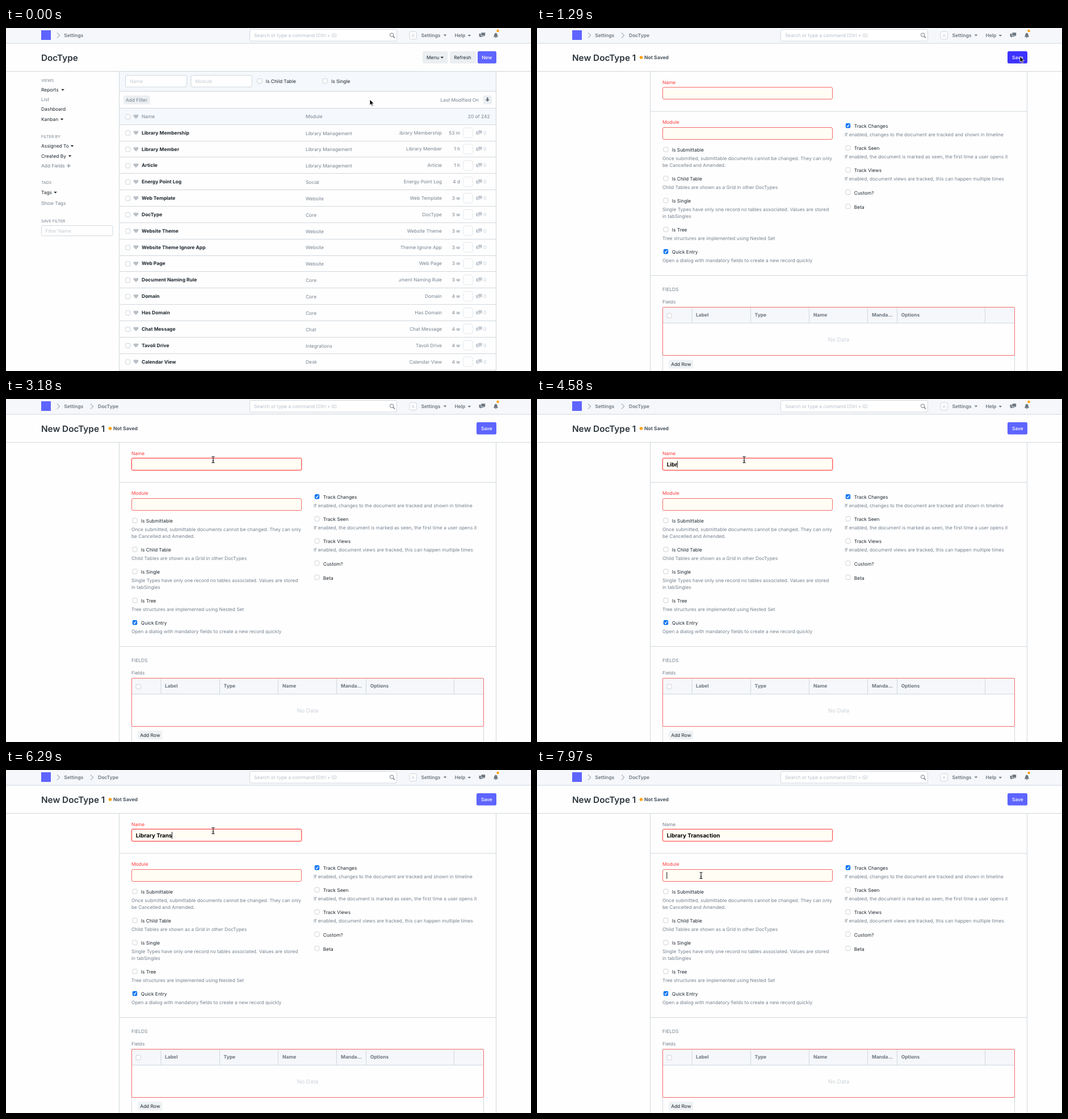
Animation, 925 px wide and 605 px high, one loop 8 s. Source, as an HTML page:

```html
<!DOCTYPE html>
<html lang="en">
<head>
<meta charset="utf-8">
<title>DocType</title>
<style>
html, body { margin: 0; width: 100%; height: 100%; overflow: hidden; background: #fefefe; }
svg { display: block; }
text { font-family: Inter, sans-serif; text-rendering: geometricPrecision; white-space: pre; }
</style>
</head>
<body>
<svg id="stage" width="925" height="605" viewBox="0 0 925 605"></svg>
<script>
const INK = '#1f272e', GREY = '#76828f', SLATE = '#6c7680', PALE = '#c3cad1', LINE = '#d1d8dd';
const RED = '#ff5858', BUTTON = '#ebeff2', BLUE = '#5e64ff', HEAD = '#f5f7fa';

// y is the middle of the capital letters
const text = (x, y, s, fill = INK, weight = 400, size = weight > 500 ? 8.5 : 8.37, anchor = 'start') =>
  `<text x="${x}" y="${y + size * .36}" fill="${fill}" font-weight="${weight}" font-size="${size}" text-anchor="${anchor}">${s}</text>`;
const rect = (x, y, w, h, fill = 'none', stroke = 'none', r = 0, more = '') =>
  `<rect x="${x}" y="${y}" width="${w}" height="${h}" rx="${r}" fill="${fill}" stroke="${stroke}" ${more}/>`;
const path = (d, fill = 'none', stroke = 'none', more = '') =>
  `<path d="${d}" fill="${fill}" stroke="${stroke}" ${more}/>`;
const line = (d, stroke = LINE, width = 1) => path(d, 'none', stroke, `stroke-width="${width}"`);
const group = (id, body) => `<g id="${id}">${body}</g>`;
const at = (x, y, body) => `<g transform="translate(${x} ${y})">${body}</g>`;

const down = (x, y, fill = INK) => path(`M${x - 2.8} ${y - 1.4}h5.6l-2.8 3z`, fill);
const next = x => line(`M${x - 2.5} 8.3l4.6 4.7l-4.6 4.7`, '#a9b3bd', 1.2);
const heart = (x, y) => at(x, y, path('M0 4.2L-3.9 .2C-5.6-2-2.4-5.2 0-2.3C2.4-5.2 5.6-2 3.9 .2Z', '#b9bfc6'));
const chat = (x, y, fill) => at(x, y, path('M-1.6-4.2h6.8v5h-1v1.8l-1.8-1.8h-4z', fill) +
  path('M-5.4-2.4h3v4h4.4v1.2h-3.8l-1.8 1.8v-1.8h-1.8z', fill));
const check = (x, y, on) => on
  ? rect(x - 4.2, y - 4.2, 8.4, 8.4, '#0b75f5', 'none', 2) + line(`M${x - 2.2} ${y}l1.7 1.9l2.8-4`, '#fff', 1.2)
  : rect(x - 4, y - 4, 8, 8, '#fff', '#c2c6ca', 1.8, 'stroke-width=".8"');
const button = (x, y, w, h, fill = BUTTON, id = '') => rect(x, y, w, h, fill, 'none', 2.5, id && `id="${id}"`);

const header = () => rect(0, 0, 925, 27, HEAD) + line('M0 27H925M0 76.5H925') +
  rect(62, 4, 17, 17, BLUE) + next(92.5) + text(102.3, 13, 'Settings', SLATE, 600) +
  rect(429.5, 2.5, 259, 20.5, '#fff', LINE, 2.5) +
  text(437, 13, 'Search or type a command (Ctrl + G)', '#b5bec7') +
  `<circle cx="679.6" cy="12.2" r="3.2" fill="none" stroke="${SLATE}"/>` + line('M682 14.6l3 3', SLATE, 1.4) +
  rect(711, 6.5, 12.5, 13, '#fefefe', LINE, 2.5) + text(717.3, 13, 'A', PALE, 400, 8, 'middle') +
  text(731.5, 13, 'Settings', SLATE, 600) + down(773.5, 13, SLATE) +
  text(790.5, 13, 'Help', SLATE, 600) + down(816.3, 13.5, SLATE) + chat(839, 12.5, SLATE) +
  at(863, 13, path('M-4.2 2.7C-2.2 1-3.5-3.8 0-4.3C3.5-3.8 2.2 1 4.2 2.7ZM-1.3 3.3h2.6a1.3 1.3 0 0 1-2.6 0z', SLATE)) +
  '<circle cx="866.5" cy="5" r="2.2" fill="#ffa00a"/>';

const heading = s => text(62, 52.3, s, '#2b343c', 600, 15.3);

const rows = [
  ['Library Membership', 'Library Management', '53 m'],
  ['Library Member', 'Library Management', '1 h'],
  ['Article', 'Library Management', '1 h'],
  ['Energy Point Log', 'Social', '4 d'],
  ['Web Template', 'Website', '3 w'],
  ['DocType', 'Core', '3 w'],
  ['Website Theme', 'Website', '3 w'],
  ['Website Theme Ignore App', 'Website', '3 w'],
  ['Web Page', 'Website', '3 w'],
  ['Document Naming Rule', 'Core', '3 w'],
  ['Domain', 'Core', '4 w'],
  ['Has Domain', 'Core', '4 w'],
  ['Chat Message', 'Chat', '4 w'],
  ['Tavoli Drive', 'Integrations', '4 w'],
  ['Calendar View', 'Desk', '4 w']
];

const right = (x, y, s) => text(x, y, s, GREY, 400, 8.37, 'end');
const row = ([name, module, age], i) => {
  const y = 184.6 + 28.85 * i;
  return check(214.7, y + .6) + heart(229, y) + text(239, y, name, INK, 700) +
    text(528, y + .9, module, GREY) +
    `<g clip-path="url(#tail)">${right(768, y, name)}</g>` + right(800, y, age) +
    rect(805.5, y - 8.4, 17, 17, 'none', LINE, 3, 'stroke-dasharray="2 1.5"') +
    chat(833.5, y, PALE) + text(841, y, '0', PALE) +
    line(`M200 ${Math.round(y + 14) + .5}H863`);
};

const sidebar = () =>
  [[92, 'VIEWS'], [191, 'FILTER BY'], [272.5, 'TAGS'], [340.5, 'SAVE FILTER']]
    .map(([y, s]) => text(62, y, s, GREY, 400, 7)).join('') +
  [[109, 'Reports', 100], [161, 'Kanban', 98.5], [208, 'Assigned To', 116.5], [225.7, 'Created By', 112.5], [290, 'Tags', 87]]
    .map(([y, s, x]) => text(62, y, s) + down(x, y + .2)).join('') +
  text(62, 143, 'Dashboard') + text(62, 126, 'List', GREY) + text(62, 243, 'Add Fields', GREY) +
  text(62, 309, 'Show Tags', GREY) + line('M107 243h7M110.5 239.5v7', GREY) +
  rect(62.5, 348.5, 125.5, 18, '#fff', LINE, 2.5) + text(69.5, 358, 'Filter Name', PALE);

const list = () => heading('DocType') +
  button(734, 41, 44.5, 21.5) + text(741, 52, 'Menu') + down(768.3, 52.2) +
  button(782, 41, 46, 21.5) + text(789.3, 52, 'Refresh') +
  button(831, 41, 33, 21.5, BLUE, 'new') + text(838.3, 52, 'New', '#fff', 500) + sidebar() +
  rect(200, 77, 663, 34, '#f5f8fc') + rect(200, 142, 663, 28, '#f5f8fc') +
  line('M199.5 77V605M863.5 77V605M200 111.5H863M200 141.5H863M200 170.5H863') +
  rect(210.5, 83.5, 108, 20.5, '#fff', LINE, 2.5) + text(218, 94, 'Name', PALE) +
  rect(326, 83.5, 107.5, 20.5, '#fff', LINE, 2.5) + text(333.5, 94, 'Module', PALE) +
  check(446.8, 93.5) + text(457.8, 94.3, 'Is Child Table') + check(562, 93.5) + text(573, 94.3, 'Is Single') +
  button(207, 119, 46.5, 15.5) + text(211, 127, 'Add Filter', GREY) +
  right(833, 127, 'Last Modified On') + button(840.5, 119, 15.5, 15.5) +
  path('M847 122.5h2.6v3.6h2.3l-3.6 4l-3.6-4h2.3z', SLATE) +
  check(214.7, 156.7) + heart(229, 156) + text(239, 156.2, 'Name', GREY) + text(528, 156.2, 'Module', GREY) +
  right(852.5, 156.2, '20 of 242') + rows.map(row).join('');

const field = (id, y) => rect(221, y - .5, 300, 22, 'none', RED, 3, `id="${id}Glow" stroke-width="3" opacity="0"`) +
  rect(221.5, y, 299, 21, '#fffdf4', '#f56a6a', 2.5, `id="${id}Box"`);

const options = [
  [227, 215, 'Is Submittable', 'Once submitted, submittable documents cannot be changed. They can only', 'be Cancelled and Amended.'],
  [227, 266, 'Is Child Table', 'Child Tables are shown as a Grid in other DocTypes'],
  [227, 305, 'Is Single', 'Single Types have only one record no tables associated. Values are stored', 'in tabSingles'],
  [227, 356, 'Is Tree', 'Tree structures are implemented using Nested Set'],
  [227, 395, 'Quick Entry', 'Open a dialog with mandatory fields to create a new record quickly'],
  [548, 173, 'Track Changes', 'If enabled, changes to the document are tracked and shown in timeline'],
  [548, 212, 'Track Seen', 'If enabled, the document is marked as seen, the first time a user opens it'],
  [548, 251, 'Track Views', 'If enabled, document views are tracked, this can happen multiple times'],
  [548, 290.3, 'Custom?'],
  [548, 315.3, 'Beta']
];
const option = ([x, y, label, ...notes]) =>
  check(x, y - .7, /Quick|Changes/.test(label)) + text(x + 10.8, y + .2, label) +
  notes.map((s, i) => text(x - 6, y + 14.8 + 12 * i, s, GREY)).join('');

const form = () => next(151.5) + text(162, 13, 'DocType', SLATE, 600) + heading('New DocType 1') +
  '<circle cx="183.5" cy="52" r="2.8" fill="#ffa00a"/>' + text(189, 52, 'Not Saved', '#4b5660', 700, 8.6) +
  button(829, 41, 35, 21.5, BLUE, 'save') + text(837, 52, 'Save', '#fff', 500) +
  line('M199.5 77V605M863.5 77V605M200 147H863M200 436.5H863') +
  group('nameLabel', text(221, 95.5, 'Name', 'currentColor')) + field('name', 104.5) +
  text(221, 166.3, 'Module', '#ff3b3b') + field('module', 175.5) +
  '<text id="typed" x="228.7" y="118.8" font-size="9.85" font-weight="700" fill="#000"></text>' +
  rect(228.3, 109.3, 1, 12, '#111', 'none', 0, 'id="caret"') +
  options.map(option).join('') +
  text(221, 460.5, 'FIELDS', GREY) + text(221, 483, 'Fields', GREY) +
  rect(222, 493, 619, 27.5, HEAD) +
  line('M222 520.5H841M273 493V520M376.5 493V520M479.5 493V520M582.5 493V520M634.5 493V520M789.5 493V520M221.5 577V605M841.5 577V605') +
  rect(221.5, 492.5, 620, 85, 'none', '#f56a6a', 1.5) + check(233.2, 507.3) +
  [[280, 'Label'], [383.5, 'Type'], [487, 'Name'], [590, 'Manda...'], [641.7, 'Options']]
    .map(([x, s]) => text(x, 506.3, s, SLATE, 700)).join('') +
  text(531.5, 549.7, 'No Data', '#ccd2d8', 400, 9.85, 'middle') +
  button(232.3, 585, 43, 15.5, '#eff2f5') + text(236.2, 593, 'Add Row');

const $ = id => document.getElementById(id);
$('stage').innerHTML = '<clipPath id="tail"><rect x="692" y="170" width="78" height="435"/></clipPath>' +
  header() + group('list', list()) + group('form', form()) +
  group('arrow', path('M0 0V10.2L2.3 8.1L3.9 11.8L5.6 11L4 7.5H7.2Z', '#000', '#fff', 'stroke-width=".8"')) +
  group('beam', line('M-2.5-5.5Q0-5.5 0-4V4Q0 5.5-2.5 5.5M2.5-5.5Q0-5.5 0-4M0 4Q0 5.5 2.5 5.5M-1.2 1.8H1.2', '#111', 1.1));

// Each track holds its last value until the next time
const ARROW = 'arrow', BEAM = 'beam';
const pointer = [
  [0, 641, 126, ARROW], [360, 761, 89, ARROW], [500, 823, 62, ARROW], [610, 846, 52, ARROW], [730, 851, 50, ARROW],
  [1410, 790, 63, ARROW], [1530, 520, 113, ARROW], [1650, 421, 129, ARROW],
  [1890, 373, 111, BEAM], [2010, 365, 107, BEAM],
  [7320, 361, 112, BEAM], [7430, 345, 130, ARROW], [7540, 320, 156, ARROW],
  [7650, 301, 177, BEAM], [7750, 292, 184, BEAM], [7860, 289, 186, BEAM]
];
const letters = [
  [0, 0], [4100, 1], [4340, 3], [4580, 4], [4700, 5], [4810, 6], [4930, 7], [5790, 9], [5960, 10], [6080, 11],
  [6190, 12], [6290, 13], [6500, 14], [6610, 15], [6820, 16], [6930, 17], [7030, 18], [7140, 19]
];
const blink = [[0, 0], [2580, 1], [3180, 0], [3740, 1], [5430, 0], [5790, 1], [7650, 0], [7970, 1]];
const newFill = [[0, BLUE], [610, '#382eff'], [1170, '#2b1cff']];
const saveFill = [[0, '#3d32ff'], [1410, BLUE]];
const now = (track, t) => track.findLast(step => step[0] <= t).slice(1);
const set = (id, values) => { for (const k in values) $(id).setAttribute(k, values[k]); };
const show = (id, on) => set(id, { visibility: on ? 'visible' : 'hidden' });

function draw(t) {
  const filed = t >= 1290, left = t >= 7970, focus = t >= 2700;
  $('list').style.display = filed ? 'none' : '';
  $('form').style.display = filed ? '' : 'none';
  set('new', { fill: now(newFill, t) });
  set('save', { fill: now(saveFill, t) });

  const [x, y, kind] = now(pointer, t);
  for (const id of [ARROW, BEAM]) show(id, id === kind);
  set(kind, { transform: `translate(${x} ${y})` });

  const typed = $('typed'), value = 'Library Transaction'.slice(0, now(letters, t)[0]);
  typed.textContent = value;
  const end = value && filed && !left ? typed.getComputedTextLength() : 0;
  set('caret', { x: 228.3 + end, y: left ? 180 : 109.3, opacity: now(blink, t)[0] });
  set('nameLabel', { color: left ? GREY : '#ff3b3b' });
  set('nameBox', { stroke: focus ? '#ff4a4a' : '#f56a6a' });
  set('nameGlow', { opacity: left ? .12 : focus ? .22 : 0 });
}

function tick() {
  draw(performance.now() % 8000);
  requestAnimationFrame(tick);
}
tick();
</script>
</body>
</html>
```
